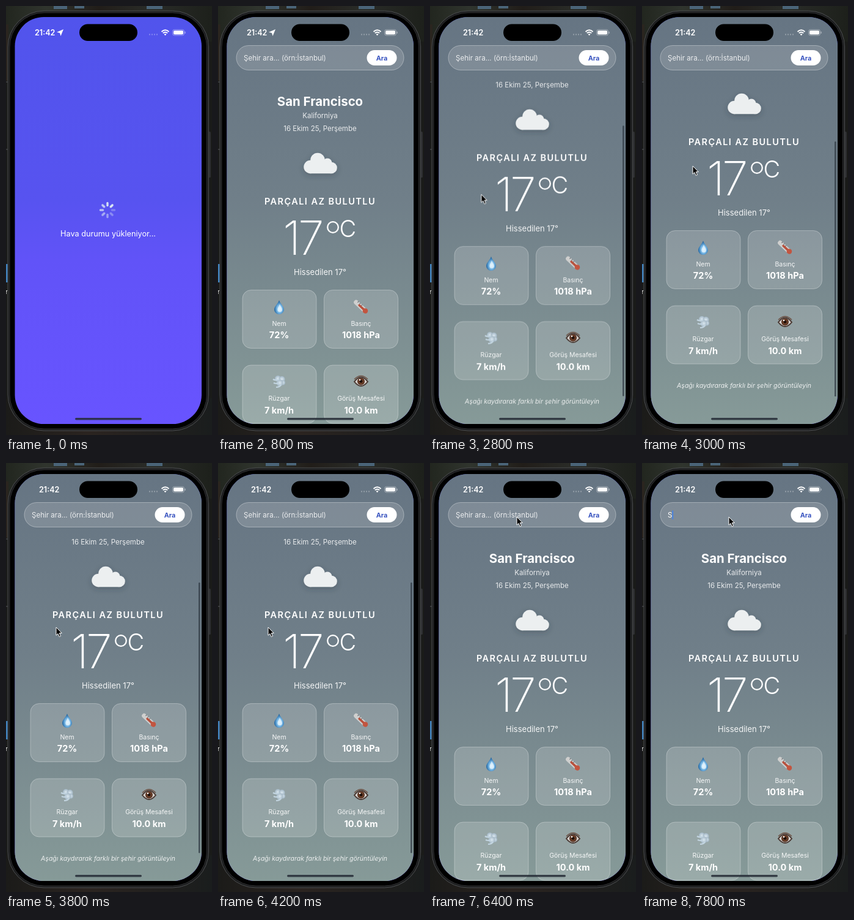
An HTML page that plays this animation: 337x700 px, repeating every 8000 ms.

```html
<!DOCTYPE html>
<html lang="tr">
<head>
<meta charset="utf-8">
<title>Hava durumu</title>
<style>
  html, body { margin: 0; width: 100%; height: 100%; overflow: hidden; background: #1a1b19; }
  svg { display: block; width: 337px; height: 700px; }
  text { font-family: Inter, Roboto, sans-serif; fill: #fff; }
  .mid { text-anchor: middle; }
  .soft { opacity: .85; }
  .label { font-size: 10.5px; opacity: .9; }
  .value { font-size: 14.5px; font-weight: 700; }

  .anim { animation: 8s linear infinite; }
  .step { animation: 8s step-end infinite; }

  .loading { animation-name: loading; }
  .main { animation-name: main; }
  .clock { animation-name: clock; }
  .locator { animation-name: locator; }
  .scroll { animation-name: scroll; }
  .bar { animation-name: bar; }
  .barFade { animation-name: barFade; }
  .cursor { animation-name: cursor; }
  .hint { animation-name: hint; }
  .typed { animation-name: typed; }
  .caret { animation-name: caret; }
  .spoke { animation: spoke 1s steps(8, jump-none) infinite; }

  @keyframes loading { 0% { opacity: 1 } 5%, 100% { opacity: 0 } }
  @keyframes main { 0% { opacity: 0 } 5%, 100% { opacity: 1 } }
  @keyframes clock { 0% { transform: none } 17.5%, 100% { transform: translateX(7px) } }
  @keyframes locator { 0% { opacity: 1 } 17.5%, 100% { opacity: 0 } }
  @keyframes spoke { from { opacity: 1 } to { opacity: .28 } }

  @keyframes scroll {
    0%, 32% { transform: none; animation-timing-function: ease-in }
    35% { transform: translateY(-71px); animation-timing-function: ease-out }
    37.5% { transform: translateY(-97px); animation-timing-function: ease-in-out }
    45%, 53% { transform: translateY(-71px); animation-timing-function: ease-in-out }
    60%, 100% { transform: none }
  }
  @keyframes bar {
    0%, 32% { transform: none; animation-timing-function: ease-in }
    35% { transform: translateY(55px); animation-timing-function: ease-out }
    37.5% { transform: translateY(81px); animation-timing-function: ease-in-out }
    45%, 53% { transform: translateY(55px); animation-timing-function: ease-in-out }
    60%, 100% { transform: none }
  }
  @keyframes barFade { 0%, 32% { opacity: 0 } 33%, 67% { opacity: 1 } 71%, 100% { opacity: 0 } }
  @keyframes cursor {
    0%, 28% { transform: translate(-20px, 400px); animation-timing-function: ease-out }
    32% { transform: translate(85px, 372px); animation-timing-function: ease-in-out }
    37.5% { transform: translate(83px, 261px) }
    47.5%, 53% { transform: translate(82px, 268px); animation-timing-function: ease-in-out }
    58.5% { transform: translate(88px, 340px); animation-timing-function: ease-in-out }
    64%, 100% { transform: translate(142px, 88px) }
  }
  @keyframes hint { 0% { opacity: .85 } 92.5%, 100% { opacity: 0 } }
  @keyframes typed { 0% { opacity: 0 } 92.5%, 100% { opacity: 1 } }
  @keyframes caret {
    0% { opacity: 0; transform: translateX(-8px) }
    72.5% { opacity: 1; transform: translateX(-8px) }
    80% { opacity: 0; transform: translateX(-8px) }
    85% { opacity: 1; transform: translateX(-8px) }
    92.5%, 100% { opacity: 1; transform: none }
  }
</style>
</head>
<body>
<svg viewBox="0 0 337 700">
  <defs>
    <linearGradient id="violet" x2="0" y2="1">
      <stop stop-color="#5154ec"/><stop offset=".45" stop-color="#5753f0"/>
      <stop offset=".6" stop-color="#6153f8"/><stop offset="1" stop-color="#6854ff"/>
    </linearGradient>
    <linearGradient id="overcast" x2="0" y2="1">
      <stop stop-color="#667583"/><stop offset=".45" stop-color="#707f89"/><stop offset="1" stop-color="#869a98"/>
    </linearGradient>
    <linearGradient id="forest">
      <stop stop-color="#22261f"/><stop offset=".2" stop-color="#30352e"/>
      <stop offset=".45" stop-color="#211d19"/><stop offset=".7" stop-color="#2a2c28"/>
      <stop offset="1" stop-color="#1d201b"/>
    </linearGradient>
    <linearGradient id="soil">
      <stop stop-color="#1b1b19"/><stop offset=".4" stop-color="#2b2420"/><stop offset="1" stop-color="#1a1d1d"/>
    </linearGradient>
    <radialGradient id="water" cx=".55" cy=".62" r=".55">
      <stop stop-color="#d4ecfa"/><stop offset=".5" stop-color="#78b8e6"/><stop offset="1" stop-color="#1f639f"/>
    </radialGradient>
    <radialGradient id="puff"><stop stop-color="#dce9f1"/><stop offset="1" stop-color="#a3b7c5"/></radialGradient>
    <radialGradient id="iris">
      <stop offset=".3" stop-color="#1c0f0a"/><stop offset=".5" stop-color="#74432b"/><stop offset="1" stop-color="#4a2b1d"/>
    </radialGradient>
    <filter id="shade" x="-30%" y="-30%" width="160%" height="180%">
      <feDropShadow dx="0" dy="3" stdDeviation="4.5" flood-color="#26323e" flood-opacity=".32"/>
    </filter>
    <clipPath id="screen"><rect x="14.500" y="18" width="305.500" height="664" rx="47.500"/></clipPath>
    <clipPath id="viewport"><rect x="14" y="114" width="306" height="568"/></clipPath>
    <clipPath id="track"><rect x="312" y="130" width="8" height="507"/></clipPath>
    <rect id="card" width="121" height="95" rx="14" fill="#fff" fill-opacity=".17" stroke="#fff" stroke-opacity=".3"/>
  </defs>

  <!-- desktop -->
  <rect width="337" height="700" fill="#1a1b19"/>
  <rect width="337" height="58" fill="url(#forest)"/>
  <path d="M78 0h22v5h-22zM112 0h16v4h-16zM230 0h26v5h-26z" fill="#4a6478"/>
  <rect y="640" width="337" height="60" fill="url(#soil)"/>
  <rect y="30" width="4" height="92" fill="#2a251f"/>
  <path d="M0 124h4M0 234h4" stroke="#55575a"/>
  <rect y="421" width="3" height="30" fill="#3f7fb8"/>
  <text x="-1" y="470" font-size="10">r</text>

  <!-- phone body -->
  <rect x="330" y="205" width="5" height="75" rx="1.5" fill="#2e2f31"/>
  <rect x="3" y="8" width="328.500" height="685" rx="59" fill="#1b1c1d" stroke="#4d4f51"/>
  <rect x="6" y="11" width="322.500" height="679" rx="56" fill="#000" stroke="#303133"/>

  <g clip-path="url(#screen)">
    <rect x="14" y="18" width="306" height="664" fill="url(#violet)"/>
    <g class="step loading">
      <g id="spinner" transform="translate(166 333)"></g>
      <text class="mid" x="167" y="376" font-size="12.7">Hava durumu yükleniyor...</text>
    </g>

    <g class="step main">
      <rect x="14" y="18" width="306" height="664" fill="url(#overcast)"/>
      <g clip-path="url(#viewport)">
        <g class="anim scroll">
          <text class="mid" x="167" y="162.500" font-size="20.4" font-weight="700">San Francisco</text>
          <text class="mid soft" x="167" y="183" font-size="11.5">Kaliforniya</text>
          <text class="mid soft" x="167" y="203.500" font-size="11.5">16 Ekim 25, Perşembe</text>
          <g fill="#eceff0" filter="url(#shade)">
            <circle cx="151" cy="262.500" r="10.700"/><circle cx="163" cy="251.500" r="11.800"/>
            <circle cx="179" cy="256" r="7.500"/><circle cx="185.500" cy="264" r="9.300"/>
            <rect x="151" y="254" width="34.500" height="19.200"/>
          </g>
          <text class="mid" x="167" y="323.500" font-size="14.5" font-weight="600" letter-spacing="1.45">PARÇALI AZ BULUTLU</text>
          <text x="106 131" y="406" font-size="77" font-weight="150">17</text>
          <circle cx="188" cy="361" r="8.800" fill="none" stroke="#fff" stroke-width="2.300"/>
          <text x="198.500" y="377" font-size="38" font-weight="300">C</text>
          <text class="mid" x="167" y="439" font-size="13" opacity=".92">Hissedilen 17°</text>

          <g class="mid">
            <use href="#card" x="40" y="463.500"/>
            <path d="M100 480c2 6 8 10 8 15.500a8 7.500 0 0 1-16 0c0-5.500 6-9.500 8-15.500z" fill="url(#water)"/>
            <path d="M101 486c1 4 4 6 4 9.500a3.800 3.800 0 0 1-7.600 0c0-3 2.600-5 3.600-9.500z" fill="#eef9ff" opacity=".7"/>
            <text class="label" x="100" y="521.500">Nem</text>
            <text class="value" x="100" y="542">72%</text>

            <use href="#card" x="173.500" y="463.500"/>
            <g transform="translate(234 491) rotate(-47)" stroke-linecap="round">
              <path d="M0-11V9" stroke="#cfcfce" stroke-width="7.500"/>
              <path d="M0-4V9" stroke="#b9503c" stroke-width="3.500"/>
              <circle cy="9.500" r="4.300" fill="#c25540"/>
              <path d="M2-9h1.500M2-5h1.500M2-1h1.500" stroke="#565a60"/>
            </g>
            <text class="label" x="234" y="521.500">Basınç</text>
            <text class="value" x="234" y="542">1018 hPa</text>

            <use href="#card" x="40" y="586"/>
            <g fill="url(#puff)">
              <circle cx="98" cy="608" r="5"/><circle cx="104.500" cy="609" r="5"/>
              <circle cx="106" cy="614.500" r="4"/><circle cx="101" cy="615" r="5.500"/>
              <path d="M90 609q5 3 10 0M91 615q5 2 9 0M95 622q6 0 8-4" fill="none" stroke="#c3d5e1" stroke-width="2.200"/>
            </g>
            <text class="label" x="100" y="644">Rüzgar</text>
            <text class="value" x="100" y="664.500">7 km/h</text>

            <use href="#card" x="173.500" y="586"/>
            <path d="M223 613q11-15 22 0q-11 14-22 0z" fill="#d6d0cc" stroke="#4a3a34" stroke-width="2"/>
            <path d="M223 609q11-11 22 0" fill="none" stroke="#6e5346" stroke-width="1.500"/>
            <circle cx="234" cy="612.500" r="6" fill="url(#iris)"/>
            <circle cx="232" cy="610" r="1.300" fill="#fff"/>
            <text class="label" x="234" y="644">Görüş Mesafesi</text>
            <text class="value" x="234" y="664.500">10.0 km</text>
          </g>
          <text class="mid" x="167" y="719.800" font-size="10.5" font-style="italic" opacity=".85">Aşağı kaydırarak farklı bir şehir görüntüleyin</text>
        </g>
      </g>

      <!-- search field -->
      <rect x="30" y="64.500" width="274" height="40" rx="20" fill="#fff" fill-opacity=".15" stroke="#fff" stroke-opacity=".35"/>
      <text class="step hint" x="42" y="89" font-size="11.55">Şehir ara... (örn:İstanbul)</text>
      <text class="step typed" x="42" y="89" font-size="11.55">S</text>
      <rect class="step caret" x="49.500" y="77.500" width="1.600" height="14.500" fill="#3f83f0"/>
      <rect x="243.500" y="72" width="49" height="25" rx="12.500" fill="#fff"/>
      <text class="mid" x="268" y="88.500" font-size="10.8" font-weight="700" style="fill:#3a55c0">Ara</text>

      <g class="anim barFade"><g clip-path="url(#track)">
        <rect class="anim bar" x="315" y="140" width="2.500" height="441.500" rx="1.200" fill="#333c46" opacity=".8"/>
      </g></g>
    </g>

    <!-- status bar -->
    <text class="step clock" x="47" y="48" font-size="12.6" font-weight="600">21:42</text>
    <path class="step locator" d="M94 38l-4.500 11-1.500-5-5-1.300z" fill="#fff"/>
    <g fill="#fff">
      <path d="M234 46.500h14" stroke="#fff" stroke-width="2" stroke-dasharray="2" opacity=".3"/>
      <g fill="none" stroke="#fff" stroke-width="1.900">
        <path d="M254.500 42q6-5.500 12 0M256.800 44.300q3.700-3.300 7.400 0"/>
      </g>
      <path d="M258.500 46q2-1.500 4 0l-2 2.200z"/>
      <rect x="272.500" y="38.500" width="19" height="9.500" rx="3" fill="none" stroke="#fff" stroke-opacity=".4"/>
      <rect x="274" y="40" width="16" height="6.500" rx="1.800"/>
      <rect x="292.500" y="41.500" width="1.200" height="3.500" rx=".6" opacity=".5"/>
    </g>
    <rect x="120" y="29.500" width="95" height="27.500" rx="13.750"/>
    <rect x="113" y="672" width="109" height="3.600" rx="1.800" fill="#252b35" opacity=".85"/>
  </g>

  <path class="anim cursor" d="M0 0v13.200l3-2.700 2.200 5 2.300-1-2.200-4.900h4z" fill="#000" stroke="#fff"/>
</svg>
<script>
  const spinner = document.getElementById('spinner');
  const spokes = 8, head = 1;
  for (let i = 0; i < spokes; i++) {
    const spoke = document.createElementNS(spinner.namespaceURI, 'path');
    const age = (head - i + spokes) % spokes;
    spoke.setAttribute('d', 'M0-7.500V-11.500');
    spoke.setAttribute('transform', `rotate(${i * 360 / spokes})`);
    spoke.setAttribute('stroke', '#e4f2f4');
    spoke.setAttribute('stroke-width', 3.4);
    spoke.setAttribute('stroke-linecap', 'round');
    spoke.setAttribute('class', 'spoke');
    spoke.style.animationDelay = `${-age / spokes}s`;
    spinner.append(spoke);
  }
</script>
</body>
</html>
```
